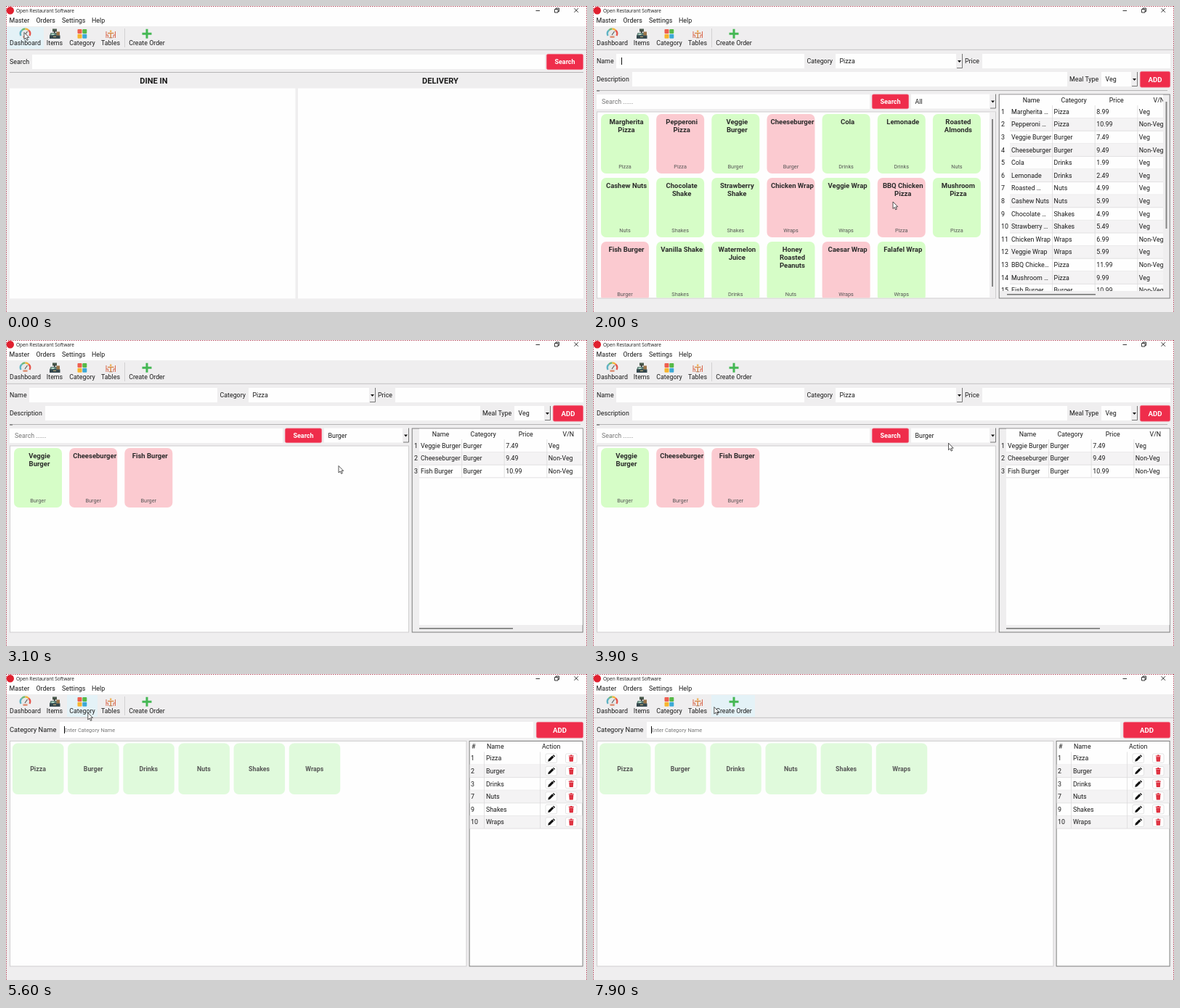
An HTML page that plays this animation: 800x422 px, repeating every 8 s.

```html
<!DOCTYPE html>
<html lang="en">
<head>
<meta charset="utf-8">
<title>Restaurant desk</title>
<style>
html, body { margin: 0; width: 100%; height: 100%; overflow: hidden; background: #efeeef; }
#stage { display: block; width: 100vw; height: 100vh; }
text { font-family: Roboto, "Liberation Sans", sans-serif; fill: #1a1a1a; white-space: pre; }
.bold { font-weight: 700; }
.mid { text-anchor: middle; }
.grey { fill: #777; }
.soft { fill: #555; }
.dark { fill: #2a2a2a; }
.white { fill: #fff; }
.title { font-family: "Open Sans", "Noto Sans", sans-serif; }
</style>
</head>
<body>
<svg id="stage" viewBox="0 0 800 422"></svg>
<script>
const RED = '#ef2d4b', PAPER = '#fefefe', BACK = '#efeeef', ALT = '#f4f3f4', GRID = '#dcdbdc';
const EDGE = '#7d7d7d', SOFT_EDGE = '#cfcecf';
const LOOP = 8000, STEP = 100, BLINK = 530;

const rect = (x, y, w, h, fill, more = '') =>
  `<rect x="${x}" y="${y}" width="${w}" height="${h}" fill="${fill}" ${more}/>`;
const path = (d, stroke, width = 1, more = '') =>
  `<path d="${d}" fill="none" stroke="${stroke}" stroke-width="${width}" ${more}/>`;
const shape = (d, fill) => `<path d="${d}" fill="${fill}"/>`;
// y is the middle of the capitals
const text = (x, y, str, cls = '', size = 8.85) =>
  `<text x="${x}" y="${(y + size * 0.355).toFixed(2)}" font-size="${size}" class="${cls}">${str}</text>`;
const clip = (x, y, w, h, body) =>
  `<svg x="${x}" y="${y}" width="${w}" height="${h}" viewBox="${x} ${y} ${w} ${h}">${body}</svg>`;
const group = (id, body) => `<g id="${id}">${body}</g>`;
const field = (x, y, w, h = 20) => rect(x, y, w, h, PAPER);
const frame = (x, y, w, h, line, fill = PAPER) =>
  rect(x + .5, y + .5, w - 1, h - 1, fill, `stroke="${line}"`);
const button = (x, y, w, h, label, size = 9) =>
  rect(x + .4, y + .4, w - .8, h - .8, RED, 'rx="2" stroke="#f2627a" stroke-width=".8"') +
  text(x + w / 2, y + h / 2, label, 'bold mid white', size);

function combo(x, y, w, value) {
  const r = x + w, m = y + 10;
  return field(x, y, w) + rect(r - 9, y, 9, 20, BACK) +
    path(`M${r - 8} ${y + 19.5}H${r - .5}V${y}`, '#777') +
    shape(`M${r - 7} ${m - 1}h5l-2.5 3z`, '#111') +
    text(x + 5.5, m, value);
}

// name with | as line break, category, veg, price, short label
const items = [
  ['Margherita|Pizza', 'Pizza', 1, '8.99', 'Margherita …'],
  ['Pepperoni|Pizza', 'Pizza', 0, '10.99', 'Pepperoni …'],
  ['Veggie|Burger', 'Burger', 1, '7.49'],
  ['Cheeseburger', 'Burger', 0, '9.49'],
  ['Cola', 'Drinks', 1, '1.99'],
  ['Lemonade', 'Drinks', 1, '2.49'],
  ['Roasted|Almonds', 'Nuts', 1, '4.99', 'Roasted …'],
  ['Cashew Nuts', 'Nuts', 1, '5.99'],
  ['Chocolate|Shake', 'Shakes', 1, '4.99', 'Chocolate …'],
  ['Strawberry|Shake', 'Shakes', 1, '5.49', 'Strawberry …'],
  ['Chicken Wrap', 'Wraps', 0, '6.99'],
  ['Veggie Wrap', 'Wraps', 1, '5.99'],
  ['BBQ Chicken|Pizza', 'Pizza', 0, '11.99', 'BBQ Chicke…'],
  ['Mushroom|Pizza', 'Pizza', 1, '9.99', 'Mushroom …'],
  ['Fish Burger', 'Burger', 0, '10.99'],
  ['Vanilla Shake', 'Shakes', 1, '4.99'],
  ['Watermelon|Juice', 'Drinks', 1, '3.99', 'Watermelon…'],
  ['Honey|Roasted|Peanuts', 'Nuts', 1, '5.49'],
  ['Caesar Wrap', 'Wraps', 0, '6.49'],
  ['Falafel Wrap', 'Wraps', 1, '6.49']
].map(([name, cat, veg, price, label = name.replace('|', ' ')]) =>
  ({ lines: name.split('|'), cat, veg, price, label }));
const cats = [[1, 'Pizza'], [2, 'Burger'], [3, 'Drinks'], [7, 'Nuts'], [9, 'Shakes'], [10, 'Wraps']];

function card(item, i) {
  const x = 11 + i % 7 * 76.15, y = 149 + Math.floor(i / 7) * 88;
  return rect(x, y, 66, 82, item.veg ? '#d6fdc7' : '#fbcad0', 'rx="7"') +
    item.lines.map((s, n) => text(x + 35, y + 10.8 + n * 11, s, 'bold mid dark', 9.5)).join('') +
    text(x + 33, y + 72.5, item.cat, 'mid soft', 7.3);
}

function itemTable(list, full) {
  const x0 = full ? 574 : 569, right = full ? 785 : 794, pitch = 17.6, top = 137;
  const left = full ? 560 : x0;
  const cols = [0, 1, 2, 3].map(n => x0 + n * 58.6);
  const heads = ['Name', 'Category', 'Price', 'V/N'];
  let out = rect(left, 122, right - left, 271, PAPER);
  heads.forEach((h, n) => out += text(cols[n] + 29.5, 129.5, h, 'mid'));
  list.slice(0, 15).forEach((it, i) => {
    const y = top + i * pitch, m = y + 8.7;
    if (i % 2) out += rect(x0, y, right - x0, pitch, ALT);
    out += path(`M${x0} ${y + pitch}H${right}`, GRID, .8) + text(562, m, i + 1);
    [it.label, it.cat, it.price, it.veg ? 'Veg' : 'Non-Veg'].forEach((s, n) =>
      out += text(cols[n] + 2, m, s));
  });
  const end = top + list.length * pitch;
  cols.slice(1).forEach(x => out += path(`M${x} ${top}V${end}`, GRID, .8));
  return frame(558.7, 121.5, 236, 282, EDGE, BACK) +
    clip(560, 122.5, right - 560, 270.5, out) +
    (full ? rect(788.5, 132, 2, 175, '#858585') : '') +
    rect(full ? 570 : 569, 397, full ? 122 : 129, 1.6, '#777');
}

function itemsPage(filter) {
  const full = filter === 'All';
  const list = items.filter(it => full || it.cat === filter);
  return text(5, 76, 'Name') + field(32, 66, 259) +
    text(294.5, 76, 'Category') + combo(334, 66, 175, 'Pizza') +
    text(512, 76, 'Price') + field(536, 66, 259) +
    text(5, 101, 'Description') + field(54, 91, 599) +
    text(656, 101, 'Meal Type') + combo(700, 91, 50, 'Veg') +
    button(753, 90, 42, 22.5, 'ADD', 9.6) +
    path('M5 116.5H791', '#b5b4b5') + path('M5 117H9', '#555') +
    field(5, 122, 376) + text(12, 132, 'Search ......', 'grey') +
    button(384, 121.5, 51, 20.5, 'Search') + combo(438, 121.5, 117, filter) +
    frame(5, 145.5, 550, 258, SOFT_EDGE) +
    (full ? rect(546, 146.5, 8, 256, BACK) : '') +
    clip(6, 146.5, 548, 256, list.map(card).join('')) +
    (full ? rect(549, 156, 2, 231, '#858585') : '') +
    itemTable(list, full);
}

const dashboardPage = () =>
  text(5, 77, 'Search') + field(36, 67, 706) + button(744, 66, 51, 22, 'Search') +
  path('M5 91.5H795', '#b5b4b5') +
  text(203.5, 103.5, 'DINE IN', 'bold mid', 11.1) + text(598, 103.5, 'DELIVERY', 'bold mid', 11.1) +
  rect(5, 113.5, 393.5, 290, PAPER) + rect(402, 113.5, 393, 290, PAPER);

function categoryPage() {
  let out = text(5, 77, 'Category Name', '', 9.3) + field(74, 66, 652, 22) +
    text(80, 77, 'Enter Category Name', 'grey', 7.4) + button(730, 66, 65, 22.5, 'ADD', 9.6) +
    frame(5, 92, 629.5, 311.5, SOFT_EDGE) + frame(637.6, 92, 157, 311.5, EDGE) +
    text(641, 100, '#') + text(662, 100, 'Name') + text(738, 100, 'Action');
  cats.forEach(([id, name], i) => {
    const x = 9 + i * 76.15, y = 107.5 + i * 17.6, m = y + 8.7;
    out += rect(x, 95.5, 70.5, 70.5, '#e0fadc', 'rx="7"') +
      text(x + 35, 130.5, name, 'bold mid soft', 8.8);
    if (i % 2) out += rect(638.6, y, 155, 17.6, ALT);
    out += path(`M638.6 ${y + 17.6}H793.6`, GRID, .8) + text(640, m, id) + text(661, m, name) +
      [743, 770.5].map(bx => rect(bx, m - 6.3, 15.5, 12.6, '#fff', 'rx="2" stroke="#dedede" stroke-width=".8"')).join('') +
      `<g transform="translate(750.7 ${m})">` +
      shape('M-4.5 4.5l.7-2.9 5.3-5.3 2.2 2.2-5.3 5.3zM2.2-4l1.1-.9 2.1 2.1-.9 1.1z', '#111') + '</g>' +
      `<g transform="translate(778.3 ${m})">` +
      shape('M-3.5-3.8h2l.6-.9h1.8l.6.9h2v1.2h-7zM-3-2h6l-.5 6.6h-5z', '#dc2333') +
      path('M-1-.8V3.4M1-.8V3.4', '#e9737d', .5) + '</g>';
  });
  return out + path('M658.5 107.5V213M735.5 107.5V213', GRID, .8);
}

const tools = [
  ['Dashboard', 1, 52, 26.5], ['Items', 52, 83, 67], ['Category', 84, 126, 105],
  ['Tables', 127, 161, 144], ['Create Order', 163, 223, 194]
];

const icons = () =>
  // gauge
  '<circle cx="26.5" cy="38.2" r="6" fill="#e6e8e8"/>' +
  [['M20.5 41A6.5 6.5 0 0 1 22 33.3', '#5fb3c4'], ['M22 33.3A6.5 6.5 0 0 1 26.5 31.5', '#6fb976'],
   ['M26.5 31.5A6.5 6.5 0 0 1 31 33.3', '#f3b53d'], ['M31 33.3A6.5 6.5 0 0 1 32.5 41', '#e6574e']]
    .map(([d, c]) => path(d, c, 2.3)).join('') +
  path('M26 40L29.5 35', '#555', 1.1) + rect(23.5, 41.5, 6, 2.3, '#df8a6e') +
  // till
  rect(64, 31.5, 6, 4, '#4a5a4c') + rect(66, 34, 1.6, 4, '#333') +
  shape('M61.5 37h11l1.5 4h-14z', '#5c7a72') + rect(60, 40.5, 14.5, 4.5, '#34474d') +
  rect(69.5, 35.5, 4.5, 5, '#9a7348') + rect(62.5, 38, 4, 2, '#a9d0c0') +
  rect(65, 42, 4, 1, '#c9b27c') +
  // tiles
  rect(98.5, 32, 6, 6, '#ef5f50', 'rx="1"') + rect(105.3, 32, 6, 6, '#57b947', 'rx="1"') +
  rect(98.5, 38.7, 6, 6, '#f7b52f', 'rx="1"') + rect(105.3, 38.7, 6, 6, '#3ca9d6', 'rx="1"') +
  // table and chairs
  path('M140 37.5H148.5M144.2 37.5V43.5', '#d98a4a', 1.4) +
  path('M138 35V40H140.5V44M138 40V44M150.5 35V40H148V44M150.5 40V44', '#d9694f', 1) +
  path('M142 43.8H146.5', '#a86a45', 1) + rect(143, 33.5, 2.4, 2.6, '#efb45c') +
  path('M194 31.7V44.7M187.5 38.2H200.5', '#45b854', 3);

const shell = () =>
  rect(0, 0, 800, 422, BACK) + rect(0, 0, 800, 28, '#fefefe') +
  '<circle cx="5.8" cy="6.3" r="5.2" fill="#e0202f"/>' +
  text(14, 6.8, 'Open Restaurant Software', 'title', 6.5) +
  path('M729.5 6.5H735M755.5 4.5H760V9H755.5zM757 4.5V3H761.5V7.5H760M782.5 3.2L788 8.8M788 3.2L782.5 8.8', '#222', .9) +
  [[4.5, 'Master'], [41.5, 'Orders'], [77, 'Settings'], [118, 'Help']]
    .map(([x, s]) => text(x, 20.3, s)).join('') +
  path('M0 60.3H800', '#c2c1c2') + path('M163.5 31V57', '#d2d1d2') +
  rect(0, 29, 0, 30, '#e4f2f7', 'id="hover"') + icons() +
  tools.map(([s, , , x]) => text(x, 51.3, s, 'mid')).join('') +
  path('M0 .5H800M.5 0V422M799.5 0V422', '#b5485c', 1, 'stroke-dasharray="1.5 1.5"');

const scenes = [
  [0, 'dashboard', dashboardPage()], [400, 'all', itemsPage('All')],
  [2700, 'burger', itemsPage('Burger')], [4200, 'drinks', itemsPage('Drinks')],
  [5500, 'categories', categoryPage()]
];
// focus start, focus end, x, top
const carets = [[1500, 2400, 39.5, 71], [5500, LOOP, 80.5, 72]];
// time, x, y
const route = [
  [0, 24.5, 36], [300, 66, 42], [400, 66, 42], [900, 190.3, 180], [1000, 190, 176], [1400, 130, 74],
  [1500, 130, 74], [2000, 412.5, 269.5], [2400, 495, 130], [2500, 495, 130], [2700, 470, 165],
  [3100, 457.5, 173], [3600, 495, 130], [3800, 495, 130], [4100, 472, 175], [4300, 472, 175],
  [5000, 339.7, 70], [5400, 110, 48], [5600, 112.3, 53], [5900, 113, 53], [6500, 140, 115],
  [7100, 215, 120], [7700, 168, 47], [7900, 166.3, 45], [LOOP, 166.3, 45]
];

const stage = document.getElementById('stage');
stage.innerHTML = shell() + scenes.map(([, id, body]) => group(id, body)).join('') +
  '<path id="caret" stroke="#111" stroke-width="1"/>' +
  '<path id="pointer" d="M.5 .5V10L2.7 8L4.2 11.4L5.8 10.7L4.3 7.4H7.2Z" fill="#fff" stroke="#2a2a2a" stroke-width=".8"/>';
const [hover, caret, pointer] = ['hover', 'caret', 'pointer'].map(id => document.getElementById(id));
const pages = scenes.map(([, id]) => document.getElementById(id));

function pointerAt(t) {
  const i = route.findIndex(p => p[0] > t);
  const [t0, x0, y0] = route[i - 1], [t1, x1, y1] = route[i];
  const u = (t - t0) / (t1 - t0), e = u * u * (3 - 2 * u);
  return [x0 + (x1 - x0) * e, y0 + (y1 - y0) * e];
}

function draw(t) {
  const now = scenes.filter(s => s[0] <= t).length - 1;
  pages.forEach((p, i) => p.setAttribute('display', i === now ? 'inline' : 'none'));

  const focus = carets.find(([a, b]) => t >= a && t < b && (t - a) % (2 * BLINK) < BLINK);
  caret.setAttribute('d', focus ? `M${focus[2]} ${focus[3]}v10` : 'M0 0');

  const [x, y] = pointerAt(t);
  pointer.setAttribute('transform', `translate(${x.toFixed(1)} ${y.toFixed(1)})`);

  const tool = y > 29 && y < 59 && tools.find(([, a, b]) => x >= a && x < b);
  hover.setAttribute('x', tool ? tool[1] : 0);
  hover.setAttribute('width', tool ? tool[2] - tool[1] : 0);
}

const start = performance.now();
function tick() {
  const t = (performance.now() - start) % LOOP;
  draw(Math.floor(t / STEP) * STEP);
  requestAnimationFrame(tick);
}
tick();
</script>
</body>
</html>
```
